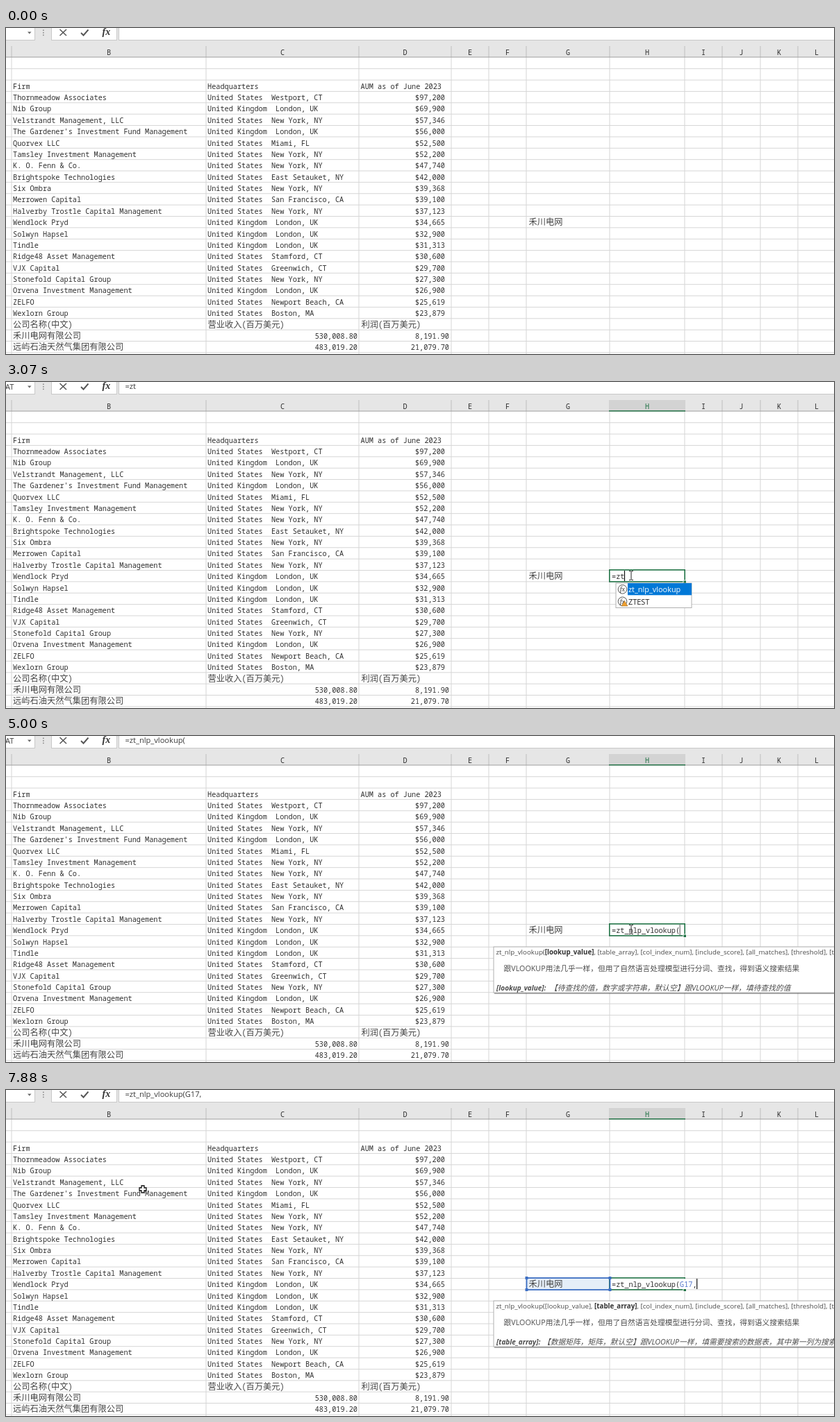
Animation of 1192 by 470 pixels, one loop 8 s. Source, as an HTML page:

```html
<!DOCTYPE html>
<html lang="zh-CN">
<head>
<meta charset="utf-8">
<title>Sheet lookup</title>
<style>
html, body { margin: 0; width: 100%; height: 100%; overflow: hidden; background: #fff; }
svg { display: block; width: 1192px; height: 470px; }
text { white-space: pre; }
.cell { font: 10.22px "Noto Sans Mono", "Liberation Mono", monospace; fill: #303030; }
.han { font: 12.26px "Noto Sans Mono CJK SC", "Noto Sans CJK SC", monospace; fill: #444; }
.ui { font-family: "Open Sans", "Noto Sans CJK SC", "Noto Sans", sans-serif; fill: #4c4c4c; }
.bar { font-size: 11.1px; fill: #3c3c3c; }
.item { font-size: 10.9px; }
.sig { font-size: 9.75px; }
.desc { font-size: 10.75px; }
.end { text-anchor: end; }
.mid { text-anchor: middle; }
.b { font-weight: 700; }
.fx { font: italic 10px "Liberation Serif", serif; fill: #333; }
</style>
</head>
<body>
<svg id="stage" viewBox="0 0 1192 470" xmlns="http://www.w3.org/2000/svg"></svg>
<script>
const LOOP = 8000, STEP = 78, TOP = 42, ROW = 16.37, ADV = 6.13;
const GREEN = '#217346', BLUE = '#3d6fc4', GRID = '#d6d6d6';
const edges = [8, 288, 508, 641, 695, 749, 869, 977, 1031, 1086, 1140, 1194];
const KEY = '禾川电网';
const firms = `Thornmeadow Associates|S|Westport, CT|$97,200
Nib Group|K|London, UK|$69,900
Velstrandt Management, LLC|S|New York, NY|$57,346
The Gardener's Investment Fund Management|K|London, UK|$56,000
Quorvex LLC|S|Miami, FL|$52,500
Tamsley Investment Management|S|New York, NY|$52,200
K. O. Fenn & Co.|S|New York, NY|$47,740
Brightspoke Technologies|S|East Setauket, NY|$42,000
Six Ombra|S|New York, NY|$39,368
Merrowen Capital|S|San Francisco, CA|$39,100
Halverby Trostle Capital Management|S|New York, NY|$37,123
Wendlock Pryd|K|London, UK|$34,665
Solwyn Hapsel|K|London, UK|$32,900
Tindle|K|London, UK|$31,313
Ridge48 Asset Management|S|Stamford, CT|$30,600
VJX Capital|S|Greenwich, CT|$29,700
Stonefold Capital Group|S|New York, NY|$27,300
Orvena Investment Management|K|London, UK|$26,900
ZELFO|S|Newport Beach, CA|$25,619
Wexlorn Group|S|Boston, MA|$23,879`.split('\n').map(l => l.split('|'));

const esc = s => s.replace(/&/g, '&amp;').replace(/</g, '&lt;');
const text = (x, y, s, cls, more = '') => `<text x="${x}" y="${y}" class="${cls}" ${more}>${esc(s)}</text>`;
const rect = (x, y, w, h, fill, more = '') => `<rect x="${x}" y="${y}" width="${w}" height="${h}" fill="${fill}" ${more}/>`;
const path = (d, stroke, w = 1, more = '') => `<path d="${d}" fill="none" stroke="${stroke}" stroke-width="${w}" ${more}/>`;
const group = (id, body) => `<g id="${id}" display="none">${body}</g>`;
const baseY = k => TOP + ROW * k + 13;
const cell = (x, k, s, cls = '') => text(x, baseY(k), s, 'cell ' + cls);
const han = (x, k, s) => text(x, baseY(k), s, 'han');

const box = (x, y, w, h) => rect(x + .5, y + .5, w - 1, h - 1, '#fff', 'stroke="#b0b0b0"');
const panel = (x, y, w, h) => rect(x + 1.5, y + 1.5, w, h, '#000', 'opacity=".35"') + box(x, y, w, h);

function toolbar() {
  return rect(0, 0, 1192, 42, '#e6e6e6') +
    rect(-2, -2, 43.5, 19.5, '#fff', 'stroke="#c8c8c8"') +
    rect(65.5, -2, 94, 19.5, '#fff', 'stroke="#c8c8c8"') +
    rect(162.5, -2, 1040, 19.5, '#fff', 'stroke="#c8c8c8"') +
    '<path d="M31 5.5h5.5l-2.7 3z" fill="#666"/>' +
    [2.5, 6, 9.5].map(y => rect(53, y, 1.6, 1.6, '#8a8a8a')).join('') +
    path('M77.5 2L87 11M87 2L77.5 11', '#555', 1.5) +
    path('M108 7L111.5 10.5L118.5 2.5', '#555', 1.9) +
    text(138.5, 10, 'fx', 'fx', 'style="font-size:14px;font-weight:700"');
}

function sheet() {
  let s = '';
  for (let k = 1; k <= 26; k++) s += rect(0, TOP + ROW * k - .2, 1192, 1, GRID);
  edges.forEach(x => s += rect(x - .5, 42, 1, 428, GRID) + rect(x - .5, 26, 1, 16, '#bdbdbd'));
  s += rect(0, 41.5, 1192, 1, '#a0a0a0');
  s += `<g id="colH" display="none">${rect(869, 26, 108, 15.5, '#d3d3d3')}${rect(868, 41, 110, 1.4, GREEN)}</g>`;
  'BCDEFGHIJKL'.split('').forEach((c, i) =>
    s += text((edges[i] + edges[i + 1]) / 2, 38.5, c, 'cell mid', `id="head${c}"`));
  s += cell(10, 2, 'Firm') + cell(290, 2, 'Headquarters') + cell(510.5, 2, 'AUM as of June 2023');
  firms.forEach(([name, land, city, aum], i) => {
    const k = i + 3;
    s += cell(10, k, name) + cell(632, k, aum, 'end') +
      cell(290, k, `United ${land === 'K' ? 'Kingdom' : 'States'}  ${city}`);
  });
  s += han(10, 23, '公司名称(中文)') + han(290.5, 23, '营业收入(百万美元)') + han(511.5, 23, '利润(百万美元)');
  [[KEY + '有限公司', '530,008.80', '8,191.90'], ['远屿石油天然气集团有限公司', '483,019.20', '21,079.70']]
    .forEach(([name, sales, gain], i) =>
      s += han(10, 24 + i, name) + cell(506, 24 + i, sales, 'end') + cell(638, 24 + i, gain, 'end'));
  return s;
}

function menu(names, picked) {
  let s = box(877.5, 289.5, 110, names.length * 17.5 + 1.5);
  names.forEach((n, i) => {
    const y = 290 + i * 17.5, on = i === picked;
    if (on) s += rect(895, y, 92, 17.3, '#0078d7');
    s += `<circle cx="887.5" cy="${y + 8.8}" r="6.3" fill="#fff" stroke="#555"/>` + text(883.8, y + 12, 'fx', 'fx');
    if (n === 'ZTEST') s += `<path d="M890.5 ${y + 8}l4.5 7.5h-9z" fill="#f0a030" stroke="#8a5a10" stroke-width=".5"/>`;
    s += text(896, y + 13, n, 'ui item', `style="fill:${on ? '#fff' : '#222'}"`);
  });
  return s;
}

const params = ['lookup_value', 'table_array', 'col_index_num', 'include_score', 'all_matches', 'threshold', 'top_n'];
const about = '跟VLOOKUP用法几乎一样，但用了自然语言处理模型进行分词、查找，得到语义搜索结果';
function hint(active, x, note) {
  const sig = params.map((p, i) => i === active ? `<tspan class="b" fill="#333">[${p}]</tspan>` : `[${p}]`).join(', ');
  return panel(701.5, 303.5, 520, 67) +
    `<text x="705.5" y="314.5" class="ui sig">zt_nlp_vlookup(${sig})</text>` +
    text(716.5, 339.3, about, 'ui desc') +
    text(706, 366.5, `[${params[active]}]:`, 'ui b', 'font-size="10" font-style="italic"') +
    text(x, 366.5, note, 'ui desc', 'font-style="italic"');
}

const corners = [[749, 271], [869, 271], [749, 288], [869, 288]]
  .map(([x, y]) => rect(x - 1.5, y - 2, 4, 4, BLUE)).join('');
const cross = 'M-2 -5h4v3h3v4h-3v3h-4v-3h-3v-4h3z';
const beam = 'M-3 -6.5h2.2l.8 1l.8 -1h2.2M0 -5.5V5.5M-3 6.5h2.2l.8 -1l.8 1h2.2';

const stage = document.getElementById('stage');
stage.innerHTML = toolbar() + text(-1, 10.5, 'AT', 'ui bar', 'id="nameBox"') +
  text(171.5, 10, '', 'ui bar', 'id="bar"') + sheet() +
  group('ref', rect(750, 272, 119, 16, '#e5eef8')) +
  han(752.5, 14, KEY) +
  group('frame', rect(868.8, 270.9, 108.4, 17, '#fff', `stroke="${GREEN}" stroke-width="1.6"`) +
    rect(974.5, 285.5, 5, 5, '#fff') + rect(975.5, 286.5, 3.5, 3.5, GREEN)) +
  group('wide', rect(970, 272, 27, 15, '#fff')) +
  group('ants', rect(749.5, 271, 120, 17, 'none', 'stroke="#fff" stroke-width="1.8"') +
    rect(749.5, 271, 120, 17, 'none', `id="dash" stroke="${BLUE}" stroke-width="1.8" stroke-dasharray="4 2"`) + corners) +
  group('solid', rect(749.5, 271, 120, 17, 'none', `stroke="${BLUE}" stroke-width="1.8"`) + corners) +
  `<text x="872" y="${baseY(14)}" class="cell"><tspan id="f1"></tspan><tspan id="f2" fill="#5577cc"></tspan><tspan id="f3"></tspan></text>` +
  rect(0, 272, 1.2, 15, '#111', 'id="caret"') +
  group('menuZ', menu(['Z.TEST', 'zero_fill', 'zh_convert', 'zh_pinyin', 'zip_list', 'zip_text', 'zone_time', 'zscore',
    'zt_nlp_vlookup', 'ZTEST'], 0) + panel(990, 296, 154, 38) + text(1001, 318, '返回 z 测试的单尾 P 值', 'ui desc')) +
  group('menuZt', menu(['zt_nlp_vlookup', 'ZTEST'], 0)) +
  group('about', panel(430.5, 295.5, 444, 38.5) + text(445, 318, about, 'ui desc')) +
  group('hint1', hint(0, 783, '【待查找的值，数字或字符串，默认空】跟VLOOKUP一样，填待查找的值')) +
  group('hint2', hint(1, 773, '【数据矩阵，矩阵，默认空】跟VLOOKUP一样，填需要搜索的数据表，其中第一列为搜索列')) +
  `<g id="pointer">${group('halo', '<circle r="9.3" fill="#ffe81a" opacity=".8"/>')}` +
  group('plus', `<path d="${cross}" fill="#fff" stroke="#111" stroke-width="1.3"/>`) +
  group('beam', path(beam, '#222')) +
  group('move', path('M0 -5V5M-5.5 0H5.5M-1.5 -3.5L0 -5L1.5 -3.5M-4 -1.5L-5.5 0L-4 1.5M4 -1.5L5.5 0L4 1.5', '#111') +
    '<path d="M2 1V11l2.2 -2l1.6 3.6l1.6 -.7l-1.6 -3.4h3z" fill="#fff" stroke="#111" stroke-width=".9"/>') + '</g>';

const $ = Object.fromEntries([...stage.querySelectorAll('[id]')].map(e => [e.id, e]));
const show = (id, on) => $[id].setAttribute('display', on ? 'inline' : 'none');

// pointer trips: start, end, from x y, to x y
const trips = [
  [270, 661, 1080, 450, 898, 279],
  [1130, 1131, 898, 279, 900, 279],
  [5240, 5709, 900, 279, 813, 274],
  [7260, 7495, 814, 275, 604, 212],
  [7720, 7877, 604, 212, 197, 143]
];
// caret opacity from each time on
const blink = [[0, 0], [1210, 1], [2210, .5], [2290, 0], [2680, 1], [3530, .6], [3600, .3], [3680, 0], [3990, 1],
  [4450, .5], [4530, 0], [5000, .6], [5090, 1], [5480, .5], [5560, 0], [6790, 1], [7260, .5], [7340, 0],
  [7720, .4], [7800, .7], [7880, 1]];
const typed = [[0, ''], [1750, '='], [2680, '=z'], [3070, '=zt'], [3990, '=zt_nlp_vlookup('],
  [5780, '=zt_nlp_vlookup(G17'], [6790, '=zt_nlp_vlookup(G17,']];
const at = (list, t) => list.filter(e => e[0] <= t).pop()[1];

function pointerAt(t) {
  const trip = trips.filter(e => e[0] <= t).pop();
  if (!trip) return [-50, -50];
  const [a, b, x0, y0, x1, y1] = trip;
  const n = Math.floor((b - a) / STEP) + 1;
  const p = Math.min(1, (Math.floor((t - a) / STEP) + 1) / n);
  return [x0 + (x1 - x0) * p, y0 + (y1 - y0) * p];
}

function draw(t) {
  const within = (a, b = LOOP) => t >= a && t < b;
  const s = at(typed, t);
  $.bar.textContent = s;
  $.f1.textContent = s.slice(0, 16);
  $.f2.textContent = s.slice(16, 19);
  $.f3.textContent = s.slice(19);
  $.caret.setAttribute('x', 871.5 + ADV * s.length);
  $.caret.setAttribute('opacity', at(blink, t));
  $.headH.style.fill = within(661) ? GREEN : '';

  show('colH', within(661));
  show('frame', within(661));
  show('nameBox', within(1820, 5780));
  show('ref', within(5780));
  show('wide', within(5780));
  show('ants', within(5780, 6790));
  show('solid', within(6790));
  show('menuZ', within(2680, 3070));
  show('menuZt', within(3070, 3990));
  show('about', within(3140, 3990));
  show('hint1', within(4080, 6870));
  show('hint2', within(6870));
  $.dash.setAttribute('stroke-dashoffset', -Math.floor(t / STEP) % 6);

  const [x, y] = pointerAt(t);
  $.pointer.setAttribute('transform', `translate(${x} ${y})`);
  const isBeam = within(1130, 5474), isMove = within(6870, 7260);
  show('beam', isBeam);
  show('move', isMove);
  show('plus', within(270) && !isBeam && !isMove);
  show('halo', within(661, 1040) || within(5780, 6090));
}

const start = performance.now();
function tick() {
  draw((performance.now() - start) % LOOP);
  requestAnimationFrame(tick);
}
tick();
</script>
</body>
</html>
```
